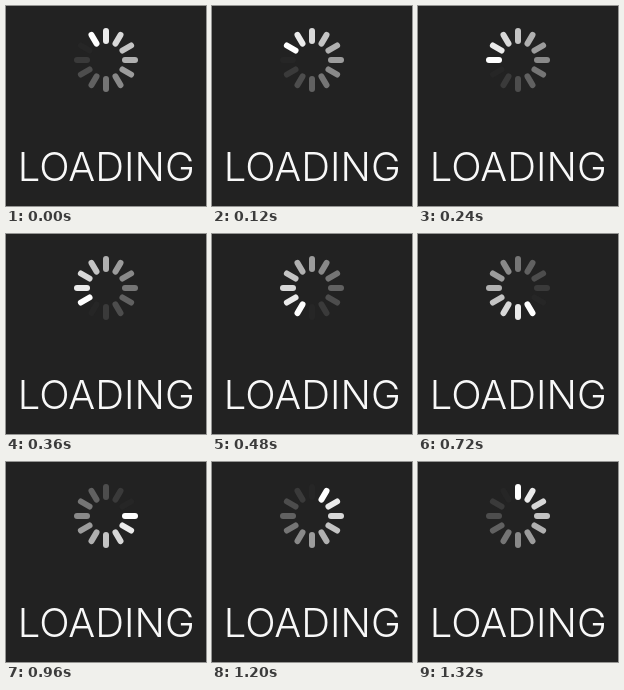
These frames come from a looping animation (200 px wide and 200 px high, 1.44 s). An HTML page with a canvas:

```html
<!DOCTYPE html>
<html lang="en">
<head>
<meta charset="utf-8">
<title>Loading</title>
<style>
  html, body { margin: 0; width: 100%; height: 100%; overflow: hidden; background: #222; }
  canvas { display: block; }
</style>
</head>
<body>
<canvas id="stage" width="200" height="200"></canvas>
<script>
const ctx = document.getElementById('stage').getContext('2d');
const SPOKES = 12, STEP = 120;
const CENTER = { x: 100, y: 54 };
const INNER = 16, OUTER = 32, WIDTH = 6;

// age 0 is the lit spoke; each step clockwise is dimmer
function spokeColor(age) {
  const v = Math.round(255 - (255 - 38) * age / (SPOKES - 1));
  return `rgb(${v},${v},${v})`;
}

function drawSpinner(step) {
  ctx.lineWidth = WIDTH;
  ctx.lineCap = 'round';
  for (let i = 0; i < SPOKES; i++) {
    const age = (i + 1 + step) % SPOKES;
    ctx.save();
    ctx.translate(CENTER.x, CENTER.y);
    ctx.rotate(i * 2 * Math.PI / SPOKES);
    ctx.strokeStyle = spokeColor(age);
    ctx.beginPath();
    ctx.moveTo(0, -INNER - WIDTH / 2);
    ctx.lineTo(0, -OUTER + WIDTH / 2);
    ctx.stroke();
    ctx.restore();
  }
}

function drawLabel() {
  ctx.font = '300 40px Inter, "Liberation Sans", sans-serif';
  ctx.textAlign = 'center';
  ctx.fillStyle = '#f8f8f8';
  ctx.fillText('LOADING', 100.2, 174.6);
}

function frame() {
  const step = Math.floor(performance.now() / STEP) % SPOKES;
  ctx.fillStyle = '#222';
  ctx.fillRect(0, 0, 200, 200);
  drawSpinner(step);
  drawLabel();
  requestAnimationFrame(frame);
}
frame();
</script>
</body>
</html>
```
